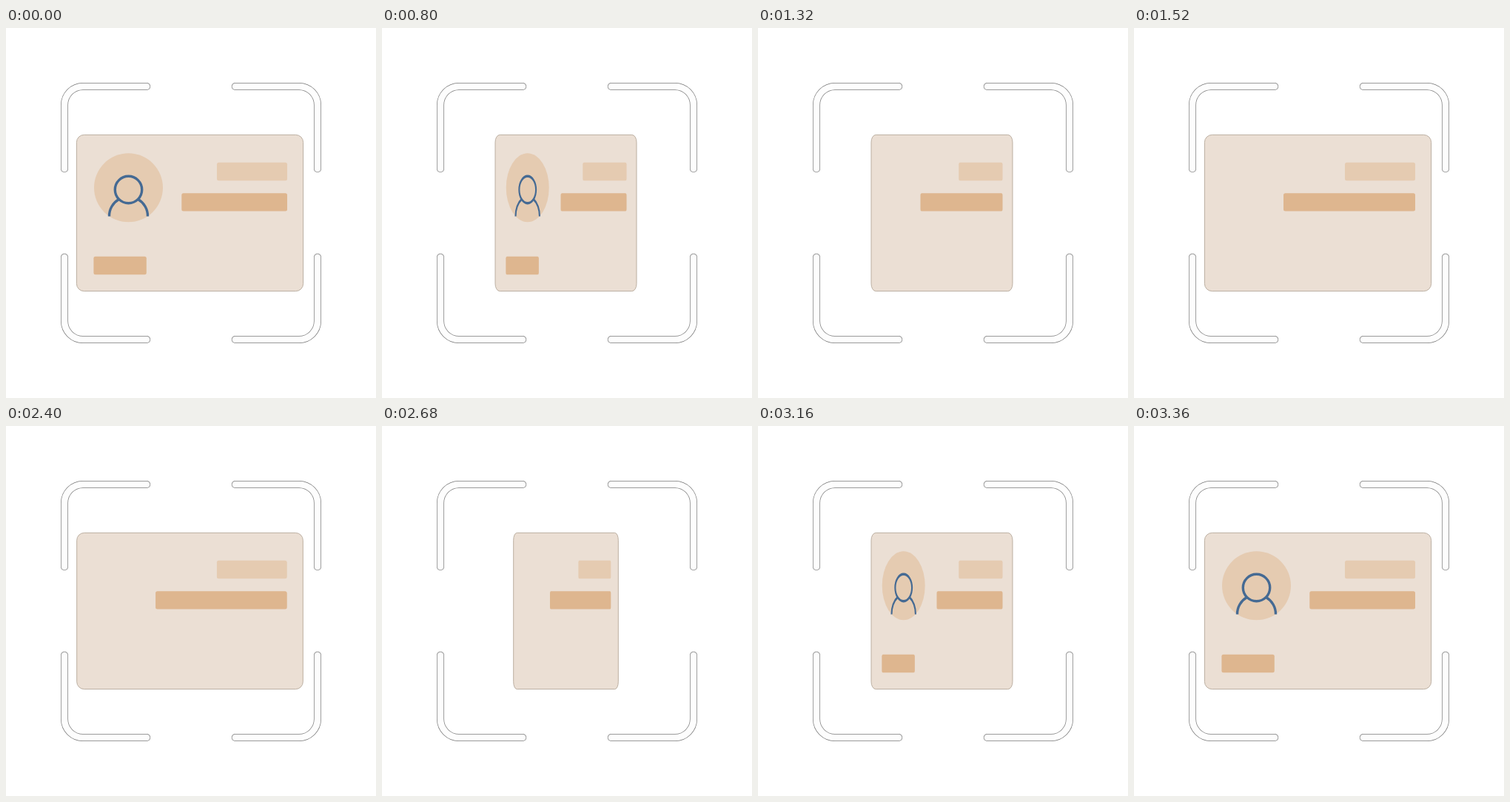
Write an HTML page that moves like this. It is 500 px wide and 500 px high and loops after 3.44 s.

```html
<!DOCTYPE html>
<html lang="en">
<head>
<meta charset="utf-8">
<title>Card scan</title>
<style>
  html, body { margin: 0; width: 100%; height: 100%; overflow: hidden; background: #fff; }
  svg { display: block; width: 100%; height: 100%; }
  .edge { fill: none; stroke: #777; stroke-width: 10; stroke-linecap: round; }
  .core { fill: none; stroke: #fdfdfd; stroke-width: 8.6; stroke-linecap: round; }
  .card { fill: #ebdfd4; stroke: #b5a799; stroke-width: .9; vector-effect: non-scaling-stroke; }
  .light { fill: #e5cbb1; }
  .dark { fill: #deb68f; }
  .person { fill: none; stroke: #456a93; stroke-width: 3.4; }
</style>
</head>
<body>
<svg viewBox="0 0 500 500">
  <defs>
    <path id="corner" d="M79 190.2V104A25 25 0 0 1 104 79H190.2"/>
    <g id="bracket">
      <use href="#corner" class="edge"/>
      <use href="#corner" class="core"/>
    </g>
    <g id="base">
      <rect class="card" x="95.4" y="144.4" width="306.2" height="211.2" rx="10"/>
      <rect class="light" x="285" y="181.7" width="95" height="24.5" rx="2.5"/>
    </g>
  </defs>

  <use href="#bracket"/>
  <use href="#bracket" transform="matrix(-1 0 0 1 500 0)"/>
  <use href="#bracket" transform="matrix(1 0 0 -1 0 500)"/>
  <use href="#bracket" transform="matrix(-1 0 0 -1 500 500)"/>

  <g id="back">
    <use href="#base"/>
    <rect class="dark" x="202" y="223.2" width="178" height="24.3" rx="2.5"/>
  </g>

  <g id="front">
    <use href="#base"/>
    <rect class="dark" x="237.3" y="223.2" width="142.7" height="24.3" rx="2.5"/>
    <rect class="dark" x="118.4" y="308.8" width="71.4" height="24.4" rx="2.5"/>
    <circle class="light" cx="165.5" cy="215.8" r="46.5"/>
    <g class="person">
      <circle cx="165.5" cy="218.5" r="18.2"/>
      <path d="M139.5 254.5A26 26 0 0 1 152.5 231.5M191.5 254.5A26 26 0 0 0 178.5 231.5"/>
    </g>
  </g>
</svg>
<script>
  const LOOP = 3440, STEP = 40, FLIP = 480, CENTER = 248.5;
  const front = document.getElementById('front');
  const back = document.getElementById('back');

  // Eased 0..1 progress of a half flip beginning at `start`
  function ease(time, start) {
    const p = Math.min(1, Math.max(0, (time - start) / FLIP));
    return p * p * (3 - 2 * p);
  }

  function setWidth(side, scale) {
    side.style.display = scale > 0.001 ? '' : 'none';
    side.setAttribute('transform', `matrix(${scale} 0 0 1 ${CENTER * (1 - scale)} 0)`);
  }

  function draw() {
    const time = Math.floor(performance.now() % LOOP / STEP) * STEP;
    // The back pauses for one step while it closes
    const backTime = time >= 2600 ? time - STEP : time;
    setWidth(front, 1 - ease(time, 600) + ease(time, 2880));
    setWidth(back, ease(time, 1040) - ease(backTime, 2388));
    requestAnimationFrame(draw);
  }
  draw();
</script>
</body>
</html>
```
